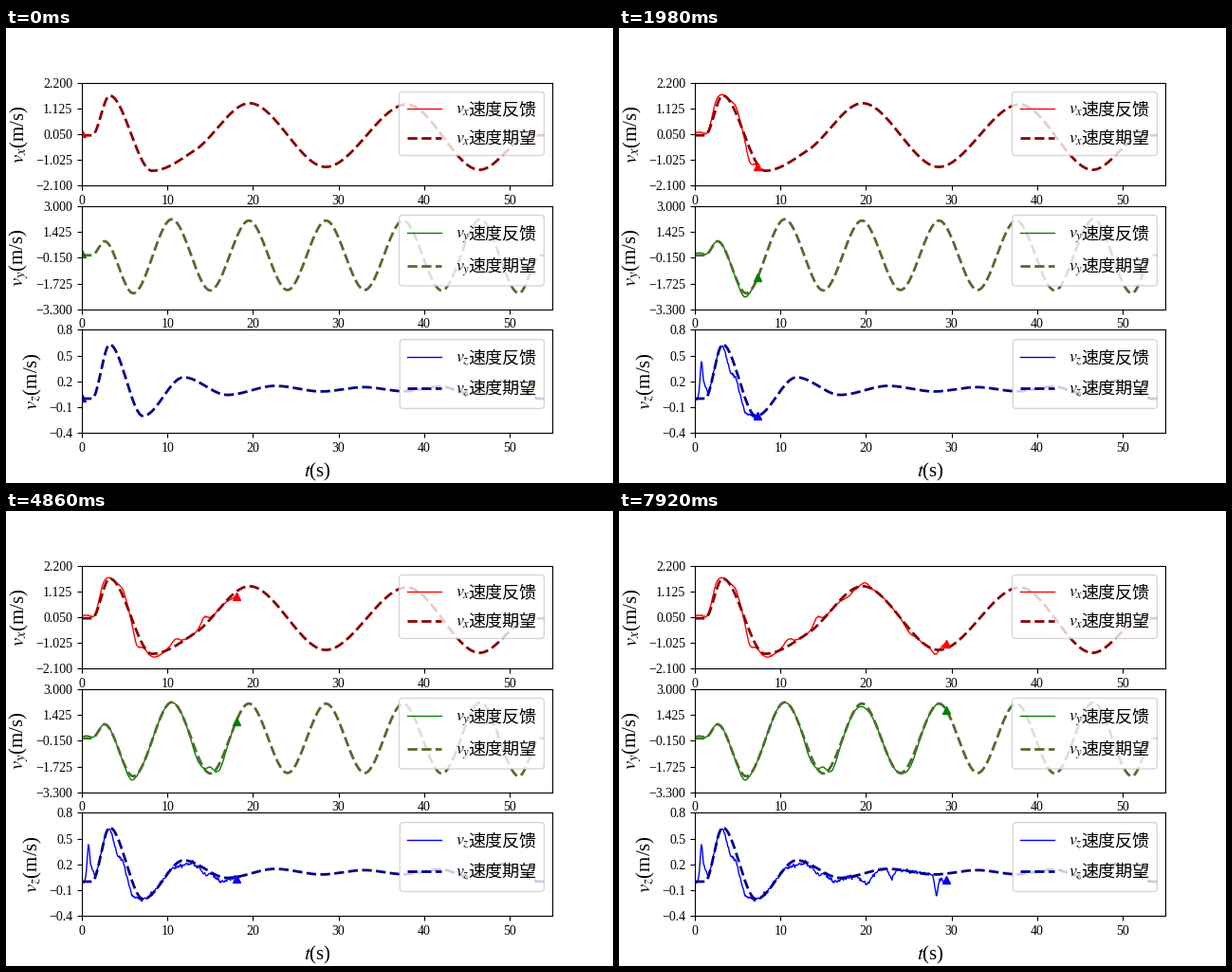
Recreate the animation shown at these times as a matplotlib script. Size 640 by 480 pixels, loop 8 s.

```python
import numpy as np
import matplotlib.pyplot as plt
from matplotlib.animation import FuncAnimation
from matplotlib.lines import Line2D
from matplotlib.patches import FancyBboxPatch
from matplotlib.transforms import Affine2D

W, H = 640, 480
FRAMES, LOOP_MS = 89, 8000
STEP = 0.334            # seconds of flight per frame
SUB = 4                 # samples per frame
START, END = 1.2, 54.1  # the plan is at rest before START

plt.rcParams.update({
    "font.family": "Liberation Serif",
    "mathtext.fontset": "stix",
    "font.size": 10,
})


def swing(knots, t):
    """Smooth curve through (time, value) knots, level at every turning point."""
    x, y = np.array(knots, float).T
    slope = np.gradient(y, x)
    rise = np.diff(y)
    slope[1:-1][rise[:-1] * rise[1:] <= 0] = 0
    slope[[0, -1]] = 0
    t = np.clip(t, x[0], x[-1])
    i = np.clip(np.searchsorted(x, t, "right") - 1, 0, len(x) - 2)
    h = x[i + 1] - x[i]
    s = (t - x[i]) / h
    return (y[i] + rise[i] * s * s * (3 - 2 * s)
            + h * s * (1 - s) * (slope[i] * (1 - s) - slope[i + 1] * s))


def plan_x(t):
    return swing([(START, 0), (3.25, 1.66), (8.2, -1.48), (13.3, -0.6),
                  (19.6, 1.34), (28.5, -1.32), (38, 1.29), (46.5, -1.44),
                  (52.5, 0)], t)


def plan_y(t):
    # even oscillation, a little wider at both ends
    waves = [(6 + 4.51 * k, -(-1) ** k * (2.12 + 0.2 * (k / 5 - 1) ** 4))
             for k in range(11)]
    return swing([(START, 0), (2.65, 0.86), *waves, (53.6, 0)], t)


def plan_z(t):
    # oscillation about 0.11 that dies down and grows again
    turns = [7.15, 11.9, 17, 22.6, 28, 33, 37.7, 42, 45.2, 49.5]
    waves = [(turn, 0.11 - (-1) ** k * (0.018 + 0.295 * np.exp(-0.9 * k)
                                        + 0.08 * np.exp(0.9 * (k - 9))))
             for k, turn in enumerate(turns)]
    return swing([(START, 0), (3.25, 0.63), *waves, (53.5, 0)], t)


def drift(bumps, t):
    """Sum of bell-shaped deviations (time, height, width)."""
    return sum(a * np.exp(-((t - c) / w) ** 2 / 2) for c, a, w in bumps)


drift_x = [(0.5, 0.13, 0.6), (2.4, 0.32, 0.4), (4.8, 0.25, 0.4),
           (6.4, -0.55, 0.4), (8.6, -0.14, 0.6), (10.9, 0.27, 0.5),
           (14.3, 0.35, 0.4), (17.9, -0.18, 0.6), (19.9, 0.15, 0.4),
           (25.1, -0.15, 0.5), (28.1, -0.2, 0.3), (29.2, 0.22, 0.35)]
drift_y = [(0.5, 0.15, 0.6), (5.7, -0.25, 0.5), (13.4, -0.3, 0.5),
           (15, 0.4, 0.4), (16.2, -0.4, 0.5), (19.8, -0.2, 0.7),
           (25.3, -0.3, 0.6)]
drift_z = [(0.75, 0.36, 0.15), (1.1, 0.15, 0.25), (4.1, -0.2, 0.4),
           (5.6, -0.16, 0.6), (11.7, -0.06, 0.6), (14.3, -0.06, 0.5),
           (16.3, -0.06, 0.5), (20.1, -0.13, 0.6), (23, -0.1, 0.3),
           (28.25, -0.23, 0.2), (29.2, -0.08, 0.4)]

# axis, limits, plan, drift, colours, legend box (left, top, bottom), legend rows
panels = [
    ("x", (-2.1, 2.2), plan_x, drift_x, "red", "darkred",
     (414.5, 67.5, 134.5), (85, 116)),
    ("y", (-3.3, 3.0), plan_y, drift_y, "green", "darkolivegreen",
     (414.5, 197.5, 272), (216, 251)),
    ("z", (-0.4, 0.8), plan_z, drift_z, "blue", "darkblue",
     (415.3, 328.6, 401.4), (347, 380)),
]

fig, axes = plt.subplots(3, 1, figsize=(W / 100, H / 100), dpi=100)
pixels = Affine2D().scale(1 / W, -1 / H).translate(0, 1) + fig.transFigure
rng = np.random.default_rng(5)
t_plan = np.linspace(0, END, 900)
t_real = np.arange((FRAMES - 1) * SUB + 1) * STEP / SUB


def draw_key(name, box, rows, styles):
    left, top, bottom = box
    fig.add_artist(FancyBboxPatch(
        (left, top), 567.4 - left, bottom - top,
        boxstyle="round,pad=0,rounding_size=3.6", transform=pixels,
        fc="white", ec="0.8", lw=1, alpha=0.8))
    for y, word, style in zip(rows, ("速度反馈", "速度期望"), styles):
        fig.add_artist(Line2D([422.8, 458.9], [y, y], transform=pixels, **style))
        fig.text(473.5, y + 6, f"$v_{name}$", transform=pixels, size=13)
        fig.text(487, y + 6, word, transform=pixels, size=13,
                 family="Noto Sans CJK JP", weight="light")


tracks = []
for ax, panel in zip(axes, panels):
    name, lim, plan, bumps, bright, dark, box, rows = panel
    solid = dict(color=bright, lw=1)
    dashed = dict(color=dark, lw=2, ls="--")
    noise = rng.normal(0, 0.012, len(t_real))
    values = plan(t_real) + drift(bumps, t_real) + noise
    line, = ax.plot([], [], **solid)
    ax.plot(t_plan, plan(t_plan), **dashed)
    tip, = ax.plot([], [], "^", color=bright, ms=6)
    ax.set(xlim=(0, 55), ylim=lim, yticks=np.linspace(*lim, 5))
    ax.set_xticks(range(0, 51, 10))
    ax.set_ylabel(f"$v_{name}$(m/s)", fontsize=15)
    draw_key(name, box, rows, (solid, dashed))
    tracks.append((line, tip, values))
axes[-1].set_xlabel("$t$(s)", fontsize=15, labelpad=5)


def update(frame):
    n = frame * SUB
    for line, tip, values in tracks:
        line.set_data(t_real[:n + 1], values[:n + 1])
        tip.set_data([t_real[n]], [values[n]])
    return [artist for track in tracks for artist in track[:2]]


anim = FuncAnimation(fig, update, frames=FRAMES, interval=LOOP_MS / FRAMES,
                     repeat=True, repeat_delay=0, blit=False)
plt.show()
```
